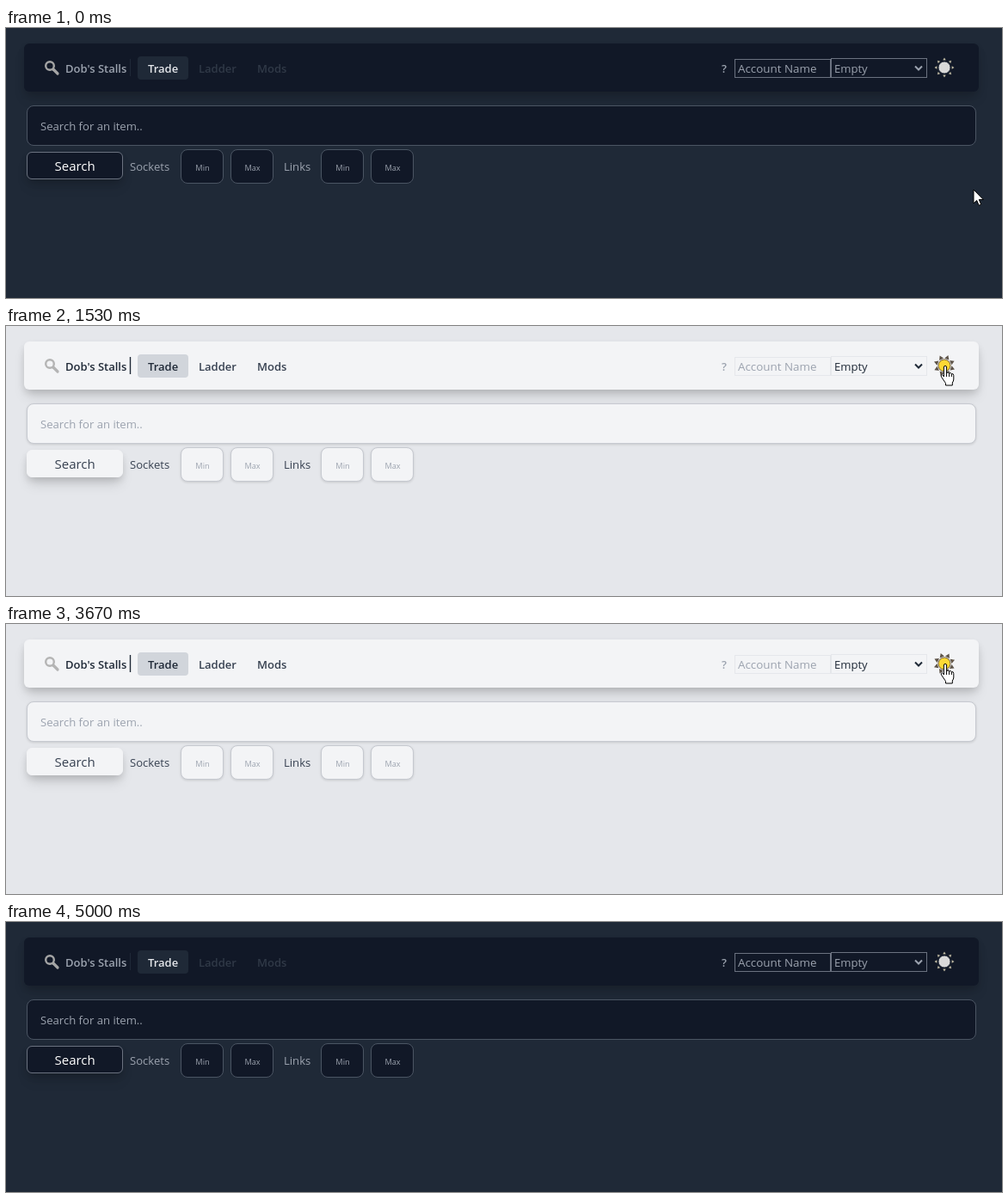
An HTML page that plays this animation: 1158 px wide and 314 px high, repeating every 6.07 s.

```html
<!DOCTYPE html>
<html lang="en">
<head>
<meta charset="utf-8">
<title>Theme toggle</title>
<style>
html, body { margin: 0; width: 100%; height: 100%; overflow: hidden; }
body {
  --bg: #1f2937; --panel: #111827; --tab: #1f2937; --line: #4b5563; --edge: #6b7280;
  --btnline: #6b7280; --rule: #1f2937; --title: #9ca3af; --active: #e5e7eb; --nav: #303947;
  --hint: #9ca3af; --label: #9ca3af; --btn: #fff; --pick: #9ca3af; --icon: #a5a5a5;
  --beam: #e5e7eb; --glow: none;
  position: relative; background: var(--bg);
}
body.light {
  --bg: #e5e7eb; --panel: #f3f4f6; --tab: #d1d5db; --line: #c6c9d0; --edge: #e5e7eb;
  --btnline: #f3f4f6; --rule: #1f2937; --title: #1f2937; --active: #1f2937; --nav: #374151;
  --label: #374151; --btn: #374151; --pick: #1f2937; --icon: #b4b4b4;
  --beam: #111; --glow: 0 1px 3px #0002;
}
div {
  position: absolute; box-sizing: border-box; background: var(--panel);
  border: 0 solid var(--line);
}
.raised { box-shadow: 0 10px 15px -3px #0002, 0 4px 8px -1px #0002; }
.field { border-width: 1px; border-radius: 8px; box-shadow: var(--glow); }
.button { border: 1px solid var(--btnline); border-radius: 6px; }
.plain { border: 1px solid var(--edge); }
svg { position: absolute; left: 0; top: 0; }
text { font: 13.1px "Open Sans", "Noto Sans", sans-serif; }
.bold { font-weight: 600; font-size: 13px; }
.small { font-size: 9.2px; text-anchor: middle; }
</style>
</head>
<body>
<svg id="art" width="1158" height="314" fill="none">
  <g stroke="var(--icon)">
    <circle cx="51" cy="44" r="4.8" stroke-width="2.4"/>
    <path d="M55 48l5 5" stroke-width="3.2" stroke-linecap="round"/>
  </g>
  <path id="rule" d="M144.5 36V56" stroke="var(--rule)" stroke-width="1.4"/>
  <path d="M1057 44.5l4 4 4-4" stroke="var(--pick)" stroke-width="2"/>
  <g id="sun"><g id="rays"></g><circle r="7" stroke-width=".8"/></g>
  <g id="cursor" stroke="#000" fill="#fff" stroke-linejoin="round">
    <path id="arrow" d="M0 0V16l3.7-3.5 2.4 5.8 2.6-1.1-2.4-5.6h5z"/>
    <path id="hand" d="M-1.6 12V1a1.6 1.6 0 0 1 3.2 0v6.3q1.6-1 3 .5 1.7-.8 2.7.7 2.5-.3 2.5 2v4.5q0 2-1.5 4v3h-7.8v-2.5l-5-7.3q-1-2 .7-2.5 1.2 0 2.2 2.3zM1.6 7v5M4.6 8v4M7.3 9v3"/>
    <path id="beam" d="M-3-8q3 0 3 1.5 0-1.5 3-1.5M0-7V7M-3 8q3 0 3-1.5 0 1.5 3 1.5" stroke="var(--beam)" fill="none"/>
  </g>
</svg>
<script>
const $ = id => document.getElementById(id);
const art = $('art'), ns = art.namespaceURI;

function box(x, y, w, h, cls, style = '') {
  const el = document.createElement('div');
  el.className = cls;
  el.style.cssText = `left:${x}px;top:${y}px;width:${w}px;height:${h}px;${style}`;
  art.before(el);
}
function shape(parent, name, attrs) {
  const el = document.createElementNS(ns, name);
  for (const key in attrs) el.setAttribute(key, attrs[key]);
  parent.append(el);
  return el;
}
function label(words, x, y, color, cls = '', style = '') {
  const el = shape(art, 'text', { x, y, fill: `var(--${color})`, class: cls, style });
  el.textContent = words;
  $('cursor').before(el);
}

box(21, 18, 1110, 56, 'raised', 'border-radius:6px');
box(153, 33, 59, 27, '', 'border-radius:4px;background:var(--tab)');
box(847, 36, 112, 22, 'plain');
box(959, 35, 112, 23, 'plain');
box(24, 90, 1104, 47, 'field');
box(24, 144, 112, 32, 'button raised');
[203, 261, 366, 424].forEach((x, i) => {
  box(x, 141, 50, 40, 'field');
  label(i % 2 ? 'Max' : 'Min', x + 25.5, 166, 'hint', 'small');
});

label("Dob's Stalls", 69, 52, 'title', 'bold');
label('Trade', 165, 52, 'active', 'bold');
label('Ladder', 224, 52, 'nav', 'bold');
label('Mods', 292, 52, 'nav', 'bold');
label('?', 832, 52, 'hint', 'bold');
label('Account Name', 851, 52, 'hint', '', 'font-size:13.4px');
label('Empty', 963, 52, 'pick');
label('Search for an item..', 40, 119, 'hint');
label('Search', 56.5, 166, 'btn', '', 'font-size:15px');
label('Sockets', 144, 166, 'label');
label('Links', 323, 166, 'label');

for (let i = 0; i < 8; i++)
  shape($('rays'), 'path', { d: 'M-1.4-8.8L0-11.2 1.4-8.8z', transform: `rotate(${i * 45})` });

// time, x, y of the pointer
const stops = [
  [70, 1125, 188], [640, 1092, 47], [2070, 1092, 47], [2200, 1093, 62], [2330, 1092, 99],
  [2540, 1092, 99], [2800, 1092, 47], [4060, 1092, 47], [4330, 1090, 111],
  [4670, 1090, 111], [4960, 552, 280]
];
function pointer(t) {
  const i = stops.findIndex(s => s[0] > t);
  if (i < 1) return (i ? stops.at(-1) : stops[0]).slice(1);
  const [a, b] = [stops[i - 1], stops[i]];
  const u = (t - a[0]) / (b[0] - a[0]), e = u * u * (3 - 2 * u);
  return [1, 2].map(k => a[k] + (b[k] - a[k]) * e);
}

function draw(now) {
  const t = now % 6070, [x, y] = pointer(t);
  const light = t >= 1530 && t < 3730;
  const kind = y < 80 ? 'hand' : y > 90 && y < 137 ? 'beam' : 'arrow';
  const hover = kind === 'hand', warm = light || hover;
  document.body.className = light ? 'light' : '';

  const sun = $('sun'), rays = $('rays');
  sun.setAttribute('transform', `translate(1091 46) rotate(${hover ? (t - 600) * .36 : 0})`);
  sun.setAttribute('fill', warm ? '#fdd835' : '#d9d9d9');
  sun.setAttribute('stroke', light ? '#5d4a2c' : '#111827');
  rays.setAttribute('fill', warm ? '#f59a23' : '#d6cfb4');
  rays.setAttribute('stroke', light ? '#5d5348' : warm ? '#b8751d' : '#a8a290');
  rays.setAttribute('stroke-width', light ? 1.6 : .4);
  $('rule').setAttribute('stroke-width', light ? 1.4 : 1);

  for (const id of ['arrow', 'hand', 'beam']) $(id).style.display = id === kind ? '' : 'none';
  $('cursor').style.display = t < 5000 ? '' : 'none';
  $('cursor').setAttribute('transform', `translate(${Math.round(x)} ${Math.round(y)})`);
}
function loop() {
  draw(performance.now());
  requestAnimationFrame(loop);
}
loop();
</script>
</body>
</html>
```
